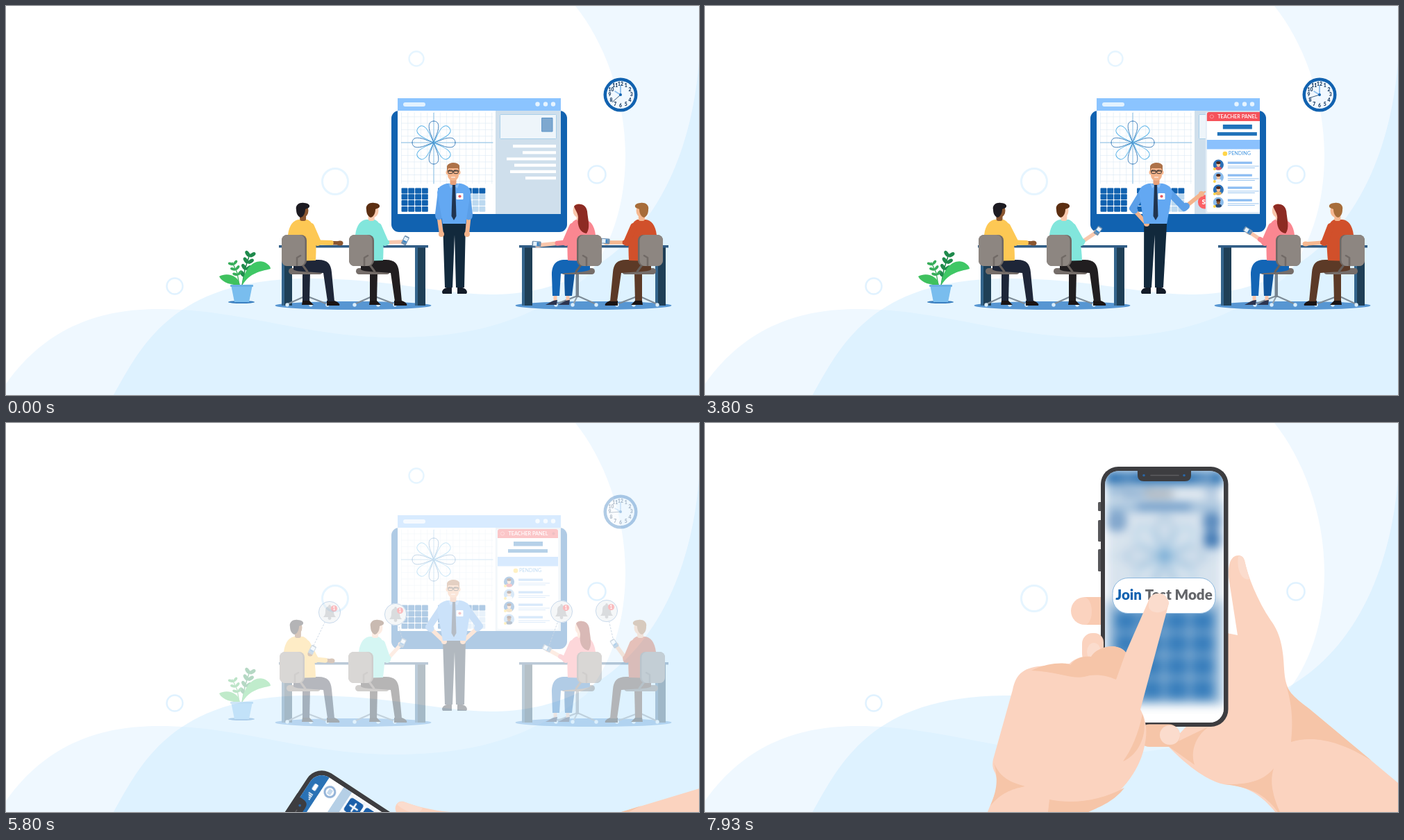
An HTML page with a canvas that plays this animation: 998 by 561 pixels, repeating every 8 s.

```html
<!DOCTYPE html>
<html lang="en">
<head>
<meta charset="utf-8">
<title>Test mode</title>
<style>
html, body { margin: 0; width: 100%; height: 100%; overflow: hidden; background: #fff; }
canvas { display: block; width: 100vw; height: 100vh; }
</style>
</head>
<body>
<canvas id="stage" width="998" height="561"></canvas>
<script>
const W = 998, H = 561, LOOP = 8000;
const BLUE = '#1162b0', SKIN = '#fbd3bf', SHADE = '#f6c5a8';
const stage = document.getElementById('stage').getContext('2d');
let c = stage;

// Drawing helpers
const fill = (d, col) => { c.fillStyle = col; c.fill(new Path2D(d)); };
const box = (x, y, w, h, r, col, edge) => {
  c.beginPath(); c.roundRect(x, y, w, h, r);
  if (col) { c.fillStyle = col; c.fill(); }
  if (edge) { c.strokeStyle = edge; c.lineWidth = 1; c.stroke(); }
};
const oval = (x, y, rx, ry, col) => {
  c.beginPath(); c.ellipse(x, y, rx, ry, 0, 0, 7); c.fillStyle = col; c.fill();
};
const dot = (x, y, r, col) => oval(x, y, r, r, col);
const ring = (x, y, r, w, col) => {
  c.beginPath(); c.arc(x, y, r, 0, 7); c.lineWidth = w; c.strokeStyle = col; c.stroke();
};
const line = (w, col, ...p) => {
  c.beginPath(); c.lineCap = c.lineJoin = 'round'; c.lineWidth = w; c.strokeStyle = col;
  for (let i = 0; i < p.length; i += 2) c.lineTo(p[i], p[i + 1]);
  c.stroke();
};
const text = (s, x, y, size, col, align = 'center', weight = 700) => {
  c.font = `${weight} ${size}px Lato, "Open Sans", sans-serif`;
  c.textAlign = align; c.textBaseline = 'middle'; c.fillStyle = col;
  c.fillText(s, x, y);
};
const group = fn => { c.save(); fn(); c.restore(); };
const layer = fn => {
  const el = document.createElement('canvas'), prev = c;
  el.width = W; el.height = H;
  c = el.getContext('2d'); fn(); c = prev;
  return el;
};

// Timing helpers
const ramp = (t, from, len) => Math.min(1, Math.max(0, (t - from) / len));
const out = p => 1 - (1 - p) ** 3;
const smooth = p => p * p * (3 - 2 * p);
const mix = (a, b, p) => a + (b - a) * p;
function track(t, keys) {
  const i = keys.findIndex(k => k[0] > t);
  if (i < 1) return keys[i ? keys.length - 1 : 0].slice(1);
  const a = keys[i - 1], b = keys[i], p = smooth(ramp(t, a[0], b[0] - a[0]));
  return a.slice(1).map((v, j) => mix(v, b[j + 1], p));
}

function background() {
  c.fillStyle = '#fff'; c.fillRect(0, 0, W, H);
  fill('M0 545C60 460 140 437 220 437C340 437 430 478 560 478C700 478 770 440 835 392C870 350 892 290 892 215C892 130 860 50 820 0H998V561H0Z', '#eff8ff');
  fill('M155 561C195 490 240 395 430 393C560 393 620 416 705 416C900 412 985 250 998 80V561Z', 'rgba(199,232,255,.45)');
  ring(474, 253, 18.5, 3, '#e6f5ff'); ring(591, 76, 10.5, 2.4, '#e6f5ff');
  ring(851, 243, 12.5, 2.6, '#e0f2ff'); ring(243, 404, 11.5, 2.4, '#e0f2ff');
}

function flower(x, y, r, w) {
  const half = s => `C${.35 * r} ${s * .1 * r} ${.5 * r} ${s * .22 * r} ${.76 * r} ${s * .22 * r}`;
  const petal = new Path2D(`M0 0${half(1)}C${.93 * r} ${.22 * r} ${r} ${.12 * r} ${r} 0M0 0${half(-1)}C${.93 * r} ${-.22 * r} ${r} ${-.12 * r} ${r} 0`);
  for (let i = 0; i < 8; i++) group(() => {
    c.translate(x, y); c.rotate(i * Math.PI / 4);
    c.lineWidth = w; c.strokeStyle = i % 2 ? '#5cb4e8' : '#3f7fbb'; c.stroke(petal);
  });
}

function graph(x, y, w, h, cx, cy, step, r) {
  for (let i = cx % step + Math.ceil((x - cx % step) / step) * step; i < x + w; i += step) line(.6, '#dbe8f3', i, y, i, y + h);
  for (let j = cy % step + Math.ceil((y - cy % step) / step) * step; j < y + h; j += step) line(.6, '#dbe8f3', x, j, x + w, j);
  line(1, '#8abfe4', x, cy, x + w, cy); line(1, '#8abfe4', cx, y, cx, y + h);
  flower(cx, cy, r, r > 40 ? 1.4 : 1);
}

function keypad(x, y, cols, dx, dy, w, h, r, col) {
  for (let i = 0; i < cols * 4; i++)
    box(x + i % cols * dx, y + Math.floor(i / cols) * dy, w, h, r, typeof col === 'string' ? col : col(Math.floor(i / cols)));
}

function clock(t) {
  dot(885, 128, 24.5, BLUE); dot(885, 128, 20, '#f1f8ff');
  for (let n = 1; n <= 12; n++) {
    const a = n * Math.PI / 6;
    text(n, 885 + 15.6 * Math.sin(a), 128.4 - 15.6 * Math.cos(a), 6.8, '#1d3f66', 'center', 900);
  }
  line(1.6, '#8ec0ee', 885, 128, 877, 123);
  line(1.4, '#6aaae6', 885, 128, 885, 115);
  const s = (38 + 1.08 * t / 1000) * Math.PI / 30;
  line(.9, '#2a4a6c', 885, 128, 885 + 16 * Math.sin(s), 128 - 16 * Math.cos(s));
  dot(885, 128, 2, BLUE);
}

function plant() {
  oval(339, 427, 19, 2, '#3a7fc0');
  line(1.5, '#1f8a4c', 340, 403, 344, 380, 351, 358);
  line(1.3, '#37ad5a', 336, 403, 333, 385, 326, 370);
  for (let i = 0; i < 4; i++) for (const s of [-1, 1]) group(() => {
    c.translate(343 + i * 2.6, 390 - i * 9.5); c.rotate(s * .8 + .2);
    oval(0, -5, 2.7, 5, '#1f8a4c');
  });
  for (let i = 0; i < 3; i++) for (const s of [-1, 1]) group(() => {
    c.translate(334 - i * 3.2, 388 - i * 7.5); c.rotate(s - .3);
    oval(0, -4, 2, 4, '#37ad5a');
  });
  fill('M337 403C335 388 318 384 307 390C312 400 325 402 337 403Z', '#3fc15f');
  fill('M340 403C342 378 358 365 371 369C376 371 381 375 381 379C366 383 352 384 340 403Z', '#3fc765');
  fill('M324 402H355L350 427H329Z', '#79bdee');
  box(323, 402, 33, 3, 1, '#6cb0e4');
}

function panel(dx) {
  c.translate(dx, 0);
  box(706, 153, 91, 146, 2, '#e3edf6');
  box(708, 153, 87, 144, 2, '#fff');
  box(708, 153, 87, 13, [3, 3, 0, 0], '#f5525a');
  text('TEACHER PANEL', 752, 160, 7.3, '#fff', 'center', 600);
  ring(715, 159.5, 2.6, .8, '#ffa4a6'); dot(788.5, 159.5, 2, '#c93d47');
  box(731, 171, 42, 6.5, 0, '#2173ba'); box(723, 182, 57, 5, 0, '#2173ba');
  box(708, 193, 87, 13.5, 0, '#8bc1fd');
  dot(734, 213, 3.3, '#ffd54a');
  text('PENDING', 739, 213.3, 7.2, '#549fe3', 'left', 500);
  for (let i = 0; i < 4; i++) {
    const y = 229 + i * 18;
    dot(724.5, y, 7.6, i % 2 ? '#8bbcec' : '#2b70b8');
    oval(724.5, y + 5, 4.6, 2.6, ['#d85a66', '#f3f6fa', '#e6b566', '#2b4a72'][i]);
    oval(724.5, y - .5, 2.7, 3.4, i < 3 ? '#f7c3a1' : '#8a5632');
    oval(724.5, y - 3, 3.2, 2, '#4a2a20');
    dot(719, y + 6, 2, '#ffd54a');
    box(738, y - 4.5, 35, 3.2, 0, '#8bbcf2');
    box(738, y + 1.6, 45, 1, 0, '#9cc6f0'); box(738, y + 4, 39, 1, 0, '#9cc6f0');
  }
}

function monitor(t) {
  box(555, 151, 253, 175, 11, BLUE);
  box(564, 133, 235, 19, 0, '#8bc4ff'); box(572, 139, 32, 6, 3, '#e2f2ff');
  for (const x of [765.5, 777, 788]) dot(x, 141.5, 3.2, '#e6f4ff');
  box(564, 151, 235, 149, 0, '#fff');
  graph(569, 154, 132, 102, 616, 197, 9.3, 31);
  keypad(569.5, 262.5, 4, 9.8, 8.8, 8.9, 7.9, 1, BLUE);
  keypad(622, 262.5, 3, 9.8, 8.8, 8.9, 7.9, 1, BLUE);
  keypad(652, 262.5, 4, 9.8, 8.8, 8.9, 7.9, 1, row => row ? '#bcd9f0' : BLUE);
  box(705, 151, 94, 149, 0, '#cfdfec');
  box(711.5, 156.5, 81, 35, 1, '#eef5fa', '#a9cfe9');
  box(772, 161.5, 15, 19.5, 0, '#7ea8cf', '#5a93c8');
  [730, 744, 721, 732, 726, 748].forEach((x, i) => box(x, 200 + i * 9.2, 792 - x, 4.2, 0, '#fff'));
  const pop = out(ramp(t, 1450, 350));
  if (pop) group(() => {
    c.globalAlpha = pop;
    c.translate(750.5, 282.5); c.scale(mix(.7, 1, pop), mix(.7, 1, pop));
    box(-40.5, -10, 81, 20, 9, '#fb6165');
    text('Start Test Mode', 0, .5, 9.8, '#fff', 'center', 900);
  });
  if (t > 3350) group(() => {
    c.beginPath(); c.rect(564, 151, 235, 149); c.clip();
    panel(92 * (1 - out(ramp(t, 3350, 990))));
  });
}

function teacher(t) {
  const down = [644, 645, 623, 300, 627, 329, 667, 300, 664, 329];
  const point = [650, 649, 616, 292, 636, 314, 690, 291, 715, 285];
  const swipe = [...point.slice(0, 9), 271];
  const hips = [644, 645, 609, 294, 631, 315, 682, 293, 658, 315];
  const [hx, sx, ax, ay, bx, by, dx, dy, ex, ey] = track(t,
    [[700, ...down], [1500, ...point], [3100, ...point], [3600, ...swipe], [4400, ...swipe], [5000, ...hips]]);
  const skin = '#f4b48c', shirt = '#63a8f2', m = (sx - 645) * .8;
  fill('M628 413C628 408 634 405 642 405V415H629ZM664 413C664 408 658 405 650 405V415H663Z', '#131b28');
  fill(`M${629 + m} 312H${662 + m}L660 406H648L${646 + m / 2} 330L643 406H632Z`, '#12293c');
  line(6, skin, dx, dy, ex, ey); dot(ex, ey, 4, skin);
  if (ex > 690) line(2.6, skin, ex, ey, ex + 5, ey - 3);
  line(6, skin, ax, ay, bx, by); dot(bx, by, 4, skin);
  line(10, '#5b9fe8', sx - 18, 267, ax, ay, mix(ax, bx, .12), mix(ay, by, .12));
  line(10, '#5b9fe8', sx + 18, 267, dx, dy, mix(dx, ex, .12), mix(dy, ey, .12));
  fill(`M${sx - 10} 256H${sx + 10}C${sx + 18} 258 ${sx + 23} 261 ${sx + 24} 269L${662 + m} 314H${629 + m}L${sx - 24} 269C${sx - 23} 261 ${sx - 18} 258 ${sx - 10} 256Z`, shirt);
  box(hx - 4.5, 247, 9, 11, 2, '#e7a07a');
  fill(`M${sx - 8} 255L${sx} 261L${sx + 8} 255L${sx + 5} 263L${sx} 258L${sx - 5} 263Z`, '#8cc1fa');
  fill(`M${sx - 2} 258H${sx + 2}L${sx + 3.5} 303L${sx} 309L${sx - 3.5} 303Z`, '#20344f');
  box(sx + 3.5, 270, 10, 9, 1, '#fff'); dot(sx + 8.5, 274.5, 2.1, '#e65a62');
  oval(hx - 8.5, 240, 2, 3, skin); oval(hx + 8.5, 240, 2, 3, skin);
  box(hx - 8, 229, 16, 23, [5, 5, 8, 8], skin);
  fill(`M${hx - 9} 239V231C${hx - 7} 225 ${hx + 6} 224 ${hx + 9} 230V239L${hx + 7} 234H${hx - 7}Z`, '#ad7249');
  for (const s of [-4, 4]) box(hx + s - 3.2, 237, 6.4, 4.6, 1.5, null, '#33302e');
  line(1, '#33302e', hx - 8, 238, hx + 8, 238);
  line(1.2, '#fff', hx - 2.5, 247, hx + 2.5, 247);
}

function desk(x) {
  oval(x + 107, 432, 112.5, 6, '#5796d2');
  for (const lx of [4, 196]) {
    box(x + lx, 348, 15, 84, 0, '#1f3f56'); box(x + lx, 348, 4, 84, 0, '#34658c');
  }
  box(x, 345, 215, 3.6, 0, '#315d86');
}

function handset(x, y, a) {
  group(() => {
    c.translate(x, y); c.rotate(a);
    box(-3.8, -6.5, 7.6, 13, 1.3, '#6e8fae'); box(-2.8, -4.8, 5.6, 8, 0, '#e4f1fb');
    box(-2.8, .5, 5.6, 2.7, 0, '#3a82c2');
  });
}

// Everyone is drawn facing right; the far desk is mirrored.
function student(t, o) {
  const [hx, lean, back, px, py, ang, show] = track(t, o.keys);
  const { skin, shirt, pants, hair, cuff, lady } = o;
  c.translate(o.x, 0); if (o.flip) c.scale(-1, 1);
  const cx = 432 + back * .3;
  line(2.2, '#7e8c98', 405, 430, cx, 418, 463, 430); line(2.2, '#95a3ae', cx, 418, 438, 430);
  for (const x of [405, 439, 463]) dot(x, 431, 2.7, '#d9edfb');
  box(cx - 2, 386, 4.5, 34, 0, '#75838f');
  if (lady) {
    line(5, skin, 446, 412, 446, 424); line(5, skin, 464, 412, 464, 424);
    fill('M425 370L445 370C452 376 451 390 450 418H440L436 386Z', '#0f559c');
    fill('M443 424C450 424 453 428 460 431H444ZM461 424C468 424 472 428 478 431H462Z', '#2d3550');
  } else {
    fill('M427 384H438L437 427H427Z', pants);
    fill('M427 425H437L443 431H426Z', '#1a1414');
    fill('M462 425H473C480 428 481 430 480 432H462Z', '#1a1414');
  }
  box(407 + back, 378, 49, 9, 4.5, '#756d69');
  fill(lady ? 'M414 366H450C464 366 469 374 469 388L468 418H458L456 386C440 384 418 384 414 380Z'
    : 'M414 366H450C463 366 468 372 469 384L473 426H463L457 385C440 383 418 384 414 380Z', pants);
  fill(`M${406 + lean} 330C${408 + lean} 315 ${414 + lean} 309 ${422 + lean} 308H${434 + lean}C${444 + lean} 312 ${448 + lean * .5} 330 446 367L412 368Z`, shirt);
  const nx = mix(428 + lean, hx, .4);
  box(nx - 4.5, 298, 9, 12, 3, skin);
  const ex = 449 + lean * .6, ey = 341;
  line(5.5, skin, ex, ey, px, py); oval(px, py, 4.5, 3.6, skin);
  if (o.phone) group(() => { c.globalAlpha = show; handset(px + 2, py - 2, ang); });
  line(10, shirt, 439 + lean, 318, ex, ey); 
  line(7, shirt, ex, ey, mix(ex, px, cuff), mix(ey, py, cuff));
  if (o.spare && show) group(() => {
    c.globalAlpha = show;
    dot(438, 333, 3.6, skin); handset(441, mix(338, 327, show), ang);
  });
  oval(hx + 1, 295, 7.5, 10, skin);
  c.translate(hx, 295);
  fill(lady ? 'M7 -6C3 -11 -10 -11 -12 1C-13 13 -17 25 -11 33C-2 32 3 22 1 10C1 4 6 -2 7 -6Z'
    : 'M-9 -1C-11 -9 -3 -12 2 -11C9 -11 12 -7 9 -4L4 -2C4 3 2 9 -3 10C-7 8 -9 4 -9 -1Z', hair);
  c.translate(-hx, -295);
  group(() => {
    c.translate(back, 0);
    line(3, '#67605c', 425, 340, 426, 372, 434, 383);
    box(397, 330, 36, 45, 8, '#6f6864'); box(397, 330, 33.5, 45, 8, '#8d8681');
    line(2.6, '#716a66', 419, 374, 419, 363, 424, 360);
  });
}

// Key values: time, head, lean, chair shift, hand x, hand y, phone angle, phone visibility
const students = [
  { x: 0, skin: '#8a5630', shirt: '#fdc854', pants: '#1e2638', hair: '#1d1b22', cuff: .6, spare: true, keys: [
    [0, 427, 0, 0, 481, 342, .5, 0], [1750, 427, 0, 0, 481, 342, .5, 0], [2350, 413, -8, -4, 473, 342, .5, 0],
    [2900, 413, -8, -4, 473, 342, .5, 0], [3600, 424, -4, -3, 473, 342, .5, 0], [4500, 424, -4, -3, 473, 342, .5, 0],
    [5250, 418, -6, -3, 469, 343, .5, 1]] },
  { x: 97, skin: '#f9c9ae', shirt: '#82e6dc', pants: '#211e20', hair: '#5c2f12', cuff: .1, phone: true, keys: [
    [0, 431, 0, 0, 476, 340, .45, 1], [800, 431, 0, 0, 476, 340, .45, 1], [1900, 420, -7, -2, 467, 327, .6, 1],
    [3600, 418, -7, -2, 467, 326, .6, 1], [4500, 418, -7, -2, 467, 326, .6, 1], [5250, 437, 5, -1, 472, 319, .45, 1]] },
  { x: 1343, flip: true, skin: '#f6b890', shirt: '#d1502b', pants: '#5c3a27', hair: '#a76d3a', cuff: .1, phone: true, keys: [
    [0, 427, 0, 0, 478, 341, 1.5, 1], [900, 427, 0, 0, 478, 341, 1.5, 1], [2200, 434, 3, -4, 478, 343, 1.5, 0],
    [4450, 434, 3, -4, 478, 343, 1.5, 0], [5200, 430, 1, -3, 465, 320, .6, 1]] },
  { x: 1255, flip: true, skin: '#fac6ab', shirt: '#fa8791', pants: '#1365b5', hair: '#8d2b23', cuff: .3, phone: true, lady: true, keys: [
    [0, 430, 0, 0, 489, 345, 1.5, 1], [1000, 430, 0, 0, 489, 345, 1.5, 1], [1900, 434, 0, 0, 467, 324, .5, 1],
    [2600, 434, 0, 0, 467, 324, .5, 1], [3500, 430, 0, 0, 471, 326, 1, 1], [5300, 427, 0, 0, 474, 327, 1.1, 1]] }
];

function bell(t, start, px, py, x, y) {
  const s = out(ramp(t, start, 400));
  if (!s) return;
  const bx = mix(px, x, s), by = mix(py, y, s), r = 16 * s;
  c.setLineDash([2, 2.5]); line(.9, '#5f86b0', px, py, bx, by); c.setLineDash([]);
  c.translate(bx, by); c.scale(r / 16, r / 16);
  dot(0, 0, 16, '#e2e7ec'); ring(0, 0, 15.6, 1, '#5f92c8');
  fill('M-9 7C-6 4 -6 1 -6 -2C-6 -7 -3 -9 0 -9C3 -9 6 -7 6 -2C6 1 6 4 9 7Z', '#8f959c');
  dot(0, 8.5, 2.4, '#8f959c'); dot(0, -9.5, 1.6, '#8f959c');
  dot(6.5, -5.5, 4.6, '#f0353c'); text('1', 6.5, -5.2, 6.5, '#fff');
}

function classroom(t) {
  plant(); clock(t); monitor(t); teacher(t);
  desk(393); desk(739);
  for (const s of students) group(() => student(t, s));
  [[5120, 570, 309, 561, 276], [5326, 443, 321, 466, 273], [5326, 874, 310, 865, 271], [5382, 781, 324, 800, 272]]
    .forEach(b => group(() => bell(t, ...b)));
}

function screen() {
  box(576, 69, 171, 363, 0, '#fff');
  box(576, 69, 171, 20, 0, '#2a72b5');
  text('12:45', 608, 79.5, 8, '#fff');
  for (let i = 0; i < 4; i++) box(704 + i * 2.6, 81 - i * 1.7, 1.7, 2 + i * 1.7, 0, '#fff');
  box(719, 76.5, 10, 6, 1.5, '#fff');
  box(582, 97, 8, 8, 1, '#2173ba');
  text('Tutor', 594, 101.5, 16.5, '#1f66ad', 'left', 900);
  const w = c.measureText('Tutor').width;
  text('Sums', 594 + w, 101.5, 16.5, '#6a6d72', 'left', 900);
  ring(730, 101, 7.5, 3, '#8fb0d6'); box(726, 98, 8, 6, 1, '#c4d8ec');
  box(576, 114, 171, 14, 0, '#b5cfe6'); box(622, 118, 78, 5, 2.5, '#1e63ae');
  box(576, 128, 171, 129, 0, '#f9fbfd');
  graph(577, 128, 169, 129, 662, 192, 13.5, 55);
  for (const [x, y] of [[582, 131], [719, 131], [719, 157]]) box(x, y, 22, 22, 4, '#1b5fa9');
  fill('M593 134L602 142H599V149H595V144H591V149H587V142H584Z', '#fff');
  line(2.6, '#fff', 724, 142, 736, 142); line(2.6, '#fff', 730, 136, 730, 148);
  line(2.6, '#fff', 724, 168, 736, 168);
  box(576, 257, 171, 149, 0, '#b5cfe6'); box(637, 259, 54, 5, 2.5, '#1e63ae');
  keypad(590, 271, 4, 36.6, 32.8, 33, 29, 3, '#3a82c2');
}

function phoneHand(t) {
  fill('M752 303L767 306L754 222C753 205 757 191 768 191C773 191 775 193 777 198C782 222 795 255 815 285C830 305 833 330 834 355C836 385 843 392 870 412L1150 646L880 650C830 575 812 524 747 521C720 515 690 490 667 466L700 430Z', SKIN);
  fill('M768 192C774 191 776 196 778 203L784 225C774 228 765 213 768 192Z', '#fbdccd');
  fill('M835 372C848 410 846 440 844 460C875 450 915 458 960 487L870 412C845 393 839 386 835 372Z', SHADE);
  fill('M747 521C785 522 805 515 819 498C812 520 818 545 840 585C815 540 795 526 747 521Z', SHADE);
  fill('M667 466L725 438C705 453 699 475 705 493Z', SHADE);
  box(527, 251, 70, 40, 20, SKIN); fill('M547 251C560 255 560 286 549 291H575V251Z', '#f9cab1');
  for (const [y, h] of [[114, 13], [140, 31], [182, 32]]) box(566, y, 6, h, 1.5, '#57575a');
  box(570, 63, 183.5, 375, 25, '#3d3d40');
  const p = ramp(t, 7270, 600), soft = 7 * (1 - (1 - p) ** 2);
  group(() => {
    c.beginPath(); c.roundRect(576, 69, 171, 363, 20); c.clip();
    c.fillStyle = '#fff'; c.fillRect(576, 69, 171, 363);
    if (soft) c.filter = `blur(${soft.toFixed(2)}px)`;
    c.drawImage(screenArt, 0, 0);
    if (soft) { c.globalAlpha = p * .16; box(580, 73, 163, 332, 0, '#3a6f9f'); }
  });
  fill('M620 63H703C700 65 700 67 700 75C700 81 697 84 691 84H632C626 84 623 81 623 75C623 67 623 65 620 63Z', '#3d3d40');
  line(1.6, '#5c5c60', 642, 75.5, 682, 75.5); dot(632, 75.5, 1.8, '#2a66a5'); dot(690, 75.5, 1.8, '#2a66a5');
  const q = out(ramp(t, 7270, 450));
  if (q) group(() => {
    c.globalAlpha = Math.min(1, q * 1.6);
    if (q < 1) c.filter = `blur(${(10 * (1 - q)).toFixed(2)}px)`;
    c.translate(661, 249); c.scale(.7 + .3 * q, .7 + .3 * q);
    box(-74, -25.5, 148, 51, 22, '#fff', '#8db8de');
    const size = 20.5;
    text('Join Test Mode', 0, 0, size, 'transparent', 'center', 900);
    const w = c.measureText('Join Test Mode').width;
    text('Join', -w / 2, 0, size, BLUE, 'left', 900);
    text('Test Mode', w / 2, 0, size, '#636569', 'right', 900);
  });
  box(543, 303, 31, 47, [16, 14, 15, 18], SKIN); oval(560, 330, 10, 13, '#fbdccd');
  box(541, 360, 31, 47, [17, 14, 16, 17], SKIN); oval(559, 388, 10, 13, '#fbdccd');
  box(624, 434.5, 60, 32.5, 16, SHADE); box(655, 436, 29, 28, 14, '#fbdccd');
}

function tapHand(t) {
  const q = out(ramp(t, 7270, 600)), k = 1 - q;
  if (k > .01) c.filter = `blur(${(12 * k).toFixed(2)}px)`;
  c.globalAlpha = 1 - .35 * k;
  c.translate(653 - 329 * k, 245 + 343 * k); c.rotate(-.52 * k); c.translate(-653, -245);
  c.fillStyle = SKIN;
  fill('M415 485L443 385C448 360 460 352 490 350L525 347C535 337 548 336 556 337C565 322 595 316 606 331L638 258C641 243 664 240 668 260L627 413C636 430 638 445 632 470C625 500 600 540 552 561L540 700H360L407 561C415 540 425 525 418 505C413 497 414 490 415 485Z', SKIN);
  fill('M470 357C495 345 520 345 526 349C535 337 548 336 556 337C565 322 595 316 606 331L592 370C578 364 562 361 546 366C530 370 505 358 470 357Z', SHADE);
  fill('M416 490C425 512 440 518 461 524C440 528 425 535 411 552C420 530 423 515 416 490Z', SHADE);
  fill('M494 561L496 543C530 550 570 545 604 526C590 545 570 553 552 561Z', SHADE);
  fill('M630 420C640 450 622 480 602 488C615 470 624 448 630 420Z', SHADE);
  fill('M639 258C642 243 664 241 668 259L666 266C661 275 643 276 639 266Z', '#fbdccd');
}

const backdrop = layer(background), screenArt = layer(screen);

function draw(t) {
  c.drawImage(backdrop, 0, 0);
  const fade = ramp(t, 5600, 300);
  if (fade < 1) classroom(t);
  if (fade) group(() => { c.globalAlpha = fade; c.drawImage(backdrop, 0, 0); });
  if (t < 5650) return;
  group(() => {
    c.translate(W, H);
    c.rotate(track(t, [[5650, -1.3], [6120, -.022], [6400, .03], [6800, 0]])[0]);
    c.translate(-W, -H);
    phoneHand(t);
  });
  if (t > 7270) group(() => tapHand(t));
}

function frame() {
  draw(performance.now() % LOOP);
  requestAnimationFrame(frame);
}
frame();
</script>
</body>
</html>
```
